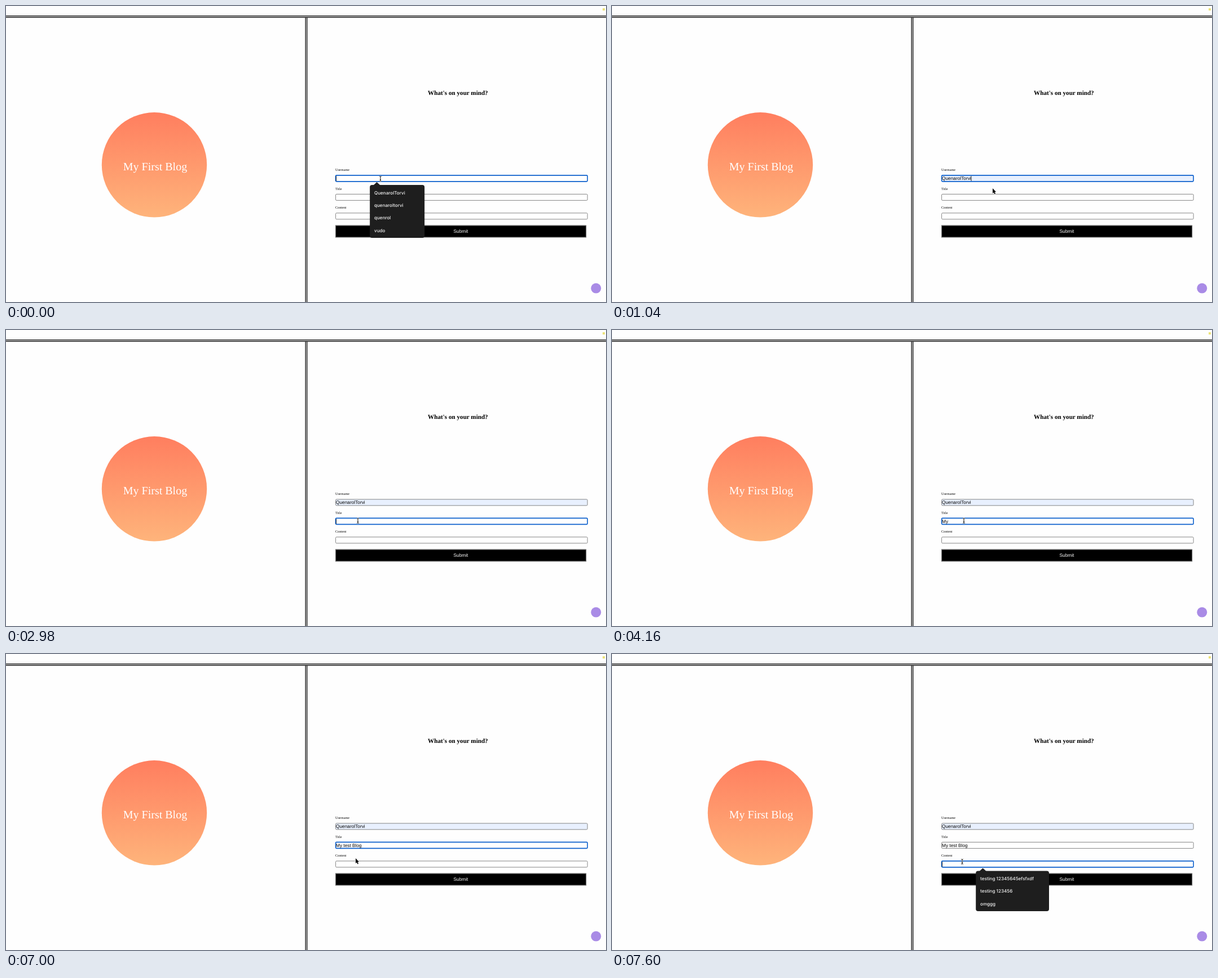
An HTML page with a canvas for the animation above (8 s loop, 1064 by 526 pixels).

```html
<!DOCTYPE html>
<html lang="en">
<head>
<meta charset="utf-8">
<title>My First Blog</title>
<style>
  html, body { margin: 0; width: 100%; height: 100%; overflow: hidden; background: #fefefe; }
  canvas { display: block; }
</style>
</head>
<body>
<canvas id="stage" width="1064" height="526"></canvas>
<script>
const ctx = document.getElementById('stage').getContext('2d');
ctx.textRendering = 'geometricPrecision';
const LOOP = 8000;
const SANS = '"Liberation Sans", Arial, sans-serif';
const SERIF = '"Liberation Serif", "Times New Roman", serif';
const INPUT_FONT = `8.3px ${SANS}`;
const USER = 'QuenarolTorvi';
const TITLE = 'My test Blog';
const FIELDS = [
  { label: 'Username', y: 300.9 },
  { label: 'Title', y: 334.4 },
  { label: 'Content', y: 367.9 }
];

// Tracks of [start time, value...]; each value holds until the next one.
const POINTER = [
  [0, 664, 307, 'beam'], [290, 668, 313, 'beam'], [440, 673, 321, 'arrow'], [590, 675, 324, 'arrow'],
  [1340, 672, 326, 'arrow'], [1490, 655, 331, 'arrow'], [1640, 636, 337, 'beam'],
  [1780, 626, 339, 'beam'], [1930, 624, 339, 'beam'],
  [6700, 623, 345, 'beam'], [6850, 621, 356, 'arrow'], [7000, 620, 363, 'arrow'],
  [7150, 620, 364, 'arrow'], [7450, 621, 369, 'beam']
];
const FOCUS = [[0, 0], [2080, 1], [7150, -1], [7450, 2]];
const HOVER = [[0, 0], [440, -1], [1640, 1], [6850, -1], [7450, 2]];
const CARET = [
  [0, true], [440, false], [1040, true], [1490, false], [2080, true], [2530, false],
  [2980, true], [4160, false], [4460, true], [6550, false], [7450, true]
];
const TYPED_AT = [3130, 3420, 3720, 4460, 4610, 4760, 4900, 5050, 5500, 5650, 5800, 6100];

const at = (track, t) => track.filter(key => key[0] <= t).pop().slice(1);

function text(str, x, y, font, color = '#000', align = 'left') {
  ctx.font = font;
  ctx.fillStyle = color;
  ctx.textAlign = align;
  ctx.fillText(str, x, y);
}

function rect(x, y, w, h, color) {
  ctx.fillStyle = color;
  ctx.fillRect(x, y, w, h);
}

function roundRect(x, y, w, h, r) {
  ctx.beginPath();
  ctx.roundRect(x, y, w, h, r);
}

function polygon(points) {
  ctx.beginPath();
  points.forEach(([x, y]) => ctx.lineTo(x, y));
  ctx.closePath();
}

function disc(x, y, r, fill) {
  ctx.fillStyle = fill;
  ctx.beginPath();
  ctx.arc(x, y, r, 0, Math.PI * 2);
  ctx.fill();
}

function drawPage() {
  rect(0, 0, 1064, 526, '#fefefe');
  rect(0, 17, 1064, 1.3, '#000');
  rect(0, 19.6, 1064, 1.3, '#000');
  rect(530.6, 20, 1.3, 506, '#000');
  rect(533.1, 20, 1.3, 506, '#000');

  const sunset = ctx.createLinearGradient(0, 189, 0, 376);
  sunset.addColorStop(0, '#ff7e5f');
  sunset.addColorStop(1, '#feb47b');
  disc(263, 282.3, 93.2, sunset);
  text('My First Blog', 264.5, 292.3, `20px ${SERIF}`, '#fff', 'center');
  text("What's on your mind?", 801.4, 158.3, `bold 11.15px ${SERIF}`, '#000', 'center');

  rect(584, 389.6, 445.2, 21.9, '#666');
  rect(584, 389.6, 444, 20.7, '#767676');
  rect(585.2, 390.8, 442.8, 19.5, '#000');
  text('Submit', 806.5, 403, INPUT_FONT, '#fff', 'center');

  rect(1058, 4, 4, 4, '#ece27a');
  disc(1046.3, 501.6, 9, '#a98be6');
}

function drawField(index, value, filled, focused, hovered, caret) {
  const { label, y } = FIELDS[index];
  text(label, 584, y - 7.9, `6.15px ${SERIF}`);
  roundRect(584.6, y, 446.5, 11, 1.6);
  ctx.fillStyle = filled ? '#e8f0fe' : '#fff';
  ctx.fill();
  ctx.lineWidth = focused ? 1.6 : 0.9;
  ctx.strokeStyle = focused ? '#0b5fcc' : hovered ? '#555' : '#777';
  ctx.stroke();
  text(value, 585, y + 8.3, INPUT_FONT);
  if (focused && caret) {
    rect(585 + ctx.measureText(value).width, y + 1.3, 0.8, 8.8, '#000');
  }
}

function drawPopup(y, width, items, selected) {
  polygon([[651.5, y + 0.5], [657.6, y - 5], [663.7, y + 0.5]]);
  ctx.fillStyle = '#1e1e1e';
  ctx.fill();
  roundRect(645.2, y, width, items.length * 22.4 + 4.4, 4);
  ctx.fill();
  items.forEach((item, i) => {
    const top = y + 2.2 + i * 22.4;
    if (i === selected) rect(645.2, top, width, 22.4, '#3c3c3c');
    text(item, 653, top + 14.4, '500 8.1px Inter, sans-serif', '#f2f2f2');
  });
}

function drawPointer(x, y, kind) {
  ctx.save();
  ctx.translate(x, y);
  ctx.lineJoin = 'round';
  if (kind === 'arrow') {
    polygon([[0, 0], [0, 9], [2, 7.2], [3.5, 10.4], [5, 9.7], [3.6, 6.6], [6.2, 6.4]]);
    ctx.lineWidth = 1.2;
    ctx.strokeStyle = '#fff';
    ctx.stroke();
    ctx.fillStyle = '#000';
    ctx.fill();
  } else {
    ctx.beginPath();
    ctx.moveTo(-1.8, -4.4);
    ctx.quadraticCurveTo(0, -4.4, 0, -3);
    ctx.quadraticCurveTo(0, -4.4, 1.8, -4.4);
    ctx.moveTo(0, -3);
    ctx.lineTo(0, 3);
    ctx.moveTo(-1.8, 4.4);
    ctx.quadraticCurveTo(0, 4.4, 0, 3);
    ctx.quadraticCurveTo(0, 4.4, 1.8, 4.4);
    ctx.moveTo(-1.1, 1.3);
    ctx.lineTo(1.1, 1.3);
    for (const [width, color] of [[1.8, '#fff'], [0.9, '#000']]) {
      ctx.lineWidth = width;
      ctx.strokeStyle = color;
      ctx.stroke();
    }
  }
  ctx.restore();
}

function draw(t) {
  const filled = t >= 440;
  const typed = TYPED_AT.filter(time => time <= t).length;
  const values = [filled ? USER : '', TITLE.slice(0, typed), ''];
  const [focus] = at(FOCUS, t);
  const [hover] = at(HOVER, t);
  const [caret] = at(CARET, t);

  drawPage();
  values.forEach((value, i) =>
    drawField(i, value, i === 0 && filled, i === focus, i === hover, caret));
  if (t < 890) {
    drawPopup(318, 97, [USER, USER.toLowerCase(), 'quenrol', 'vudo'], filled ? 0 : -1);
  }
  if (t >= 7600) {
    drawPopup(385.4, 129.8, ['testing 12345645efsfxdf', 'testing 123456', 'omggg'], -1);
  }
  drawPointer(...at(POINTER, t));
}

const start = performance.now();
function tick() {
  draw((performance.now() - start) % LOOP);
  requestAnimationFrame(tick);
}
tick();
</script>
</body>
</html>
```
